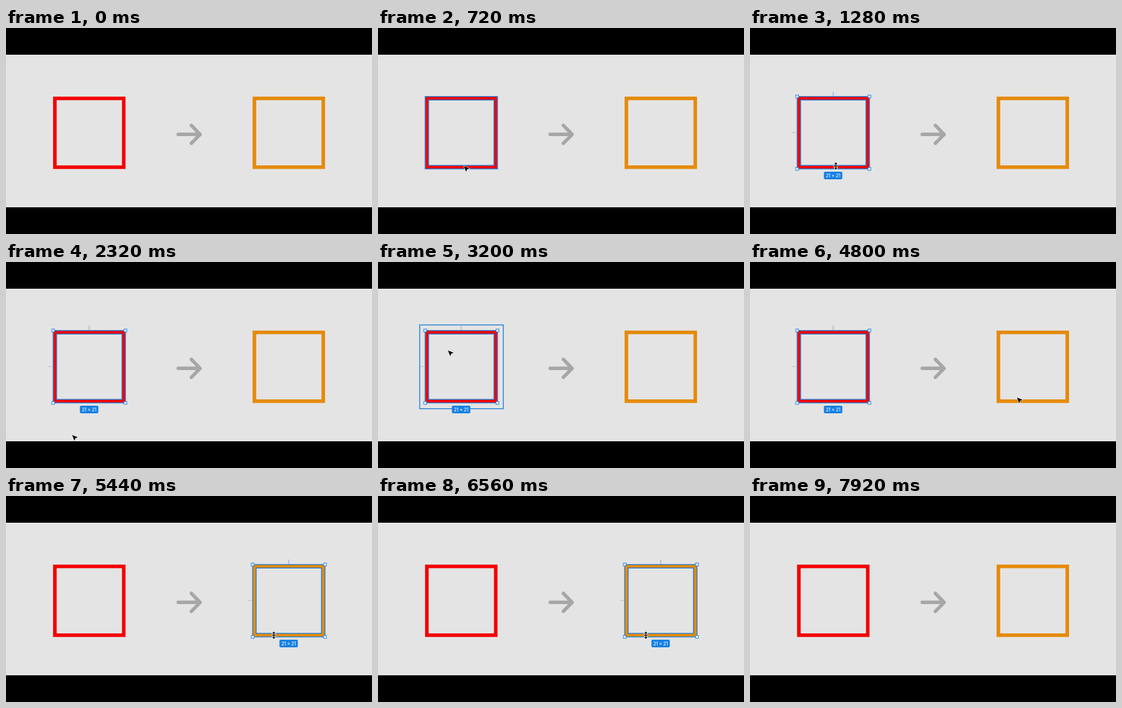
Write an HTML page that moves like this. It is 576 by 324 pixels and loops after 8 s.

```html
<!DOCTYPE html>
<html lang="en">
<head>
<meta charset="utf-8">
<title>Selecting two squares</title>
<style>
  html, body { margin: 0; width: 100%; height: 100%; overflow: hidden; background: #000; }
  svg { display: block; width: 100vw; height: 100vh; }
  .line { fill: none; stroke: #2680d8; stroke-width: 1.4; }
  .tick { fill: none; stroke: #7ba9d6; stroke-width: 1; }
  .knob { fill: #fff; stroke: #2680d8; stroke-width: 1; }
  text { font: 500 7px Inter, Arial, sans-serif; fill: #fff; text-anchor: middle; }
</style>
</head>
<body>
<svg viewBox="0 0 576 324">
  <defs>
    <g id="marks">
      <path class="tick" d="M131 100V107"/>
      <path class="tick" d="M67 164.5H74" stroke-dasharray="1 1"/>
      <rect class="knob" x="72" y="105.5" width="4.4" height="4.4"/>
      <rect class="knob" x="185.8" y="105.5" width="4.4" height="4.4"/>
      <rect class="knob" x="72" y="219.4" width="4.4" height="4.4"/>
      <rect class="knob" x="185.8" y="219.4" width="4.4" height="4.4"/>
      <rect x="116.3" y="226" width="29" height="12" rx="2" fill="#1680e3"/>
      <text x="130.8" y="234.6">21 × 21</text>
    </g>
    <g id="edges">
      <rect class="line" x="74.2" y="107.8" width="113.8" height="113.8"/>
      <rect class="line" x="79.7" y="113.3" width="102.8" height="102.8" stroke-width="1"/>
    </g>
  </defs>
  <rect width="576" height="324"/>
  <rect y="42" width="576" height="240" fill="#e4e4e4"/>
  <path d="M271 167.3H305M291.7 153.2L305.6 167.3L291.7 181.4" fill="none" stroke="#a6a6a6"
    stroke-width="5.4" stroke-linecap="round" stroke-linejoin="round"/>
  <rect x="76.9" y="110.7" width="108.4" height="108.2" fill="none" stroke="#f40000" stroke-width="5.6"/>
  <rect x="390.9" y="110.7" width="108.4" height="108.2" fill="none" stroke="#e58a08" stroke-width="5.6"/>
  <rect id="parent" class="line" x="65.6" y="99" width="131.6" height="131.7"/>
  <use id="edges0" href="#edges"/>
  <use id="edges1" href="#edges" x="314"/>
  <use id="marks0" href="#marks"/>
  <use id="marks1" href="#marks" x="314"/>
  <g id="cursor" stroke="#fff" stroke-linejoin="round" paint-order="stroke">
    <path id="arrow" d="M0 0L9.2 3.7L5.3 5.2L3.6 9.3Z" fill="#080808" stroke-width="1.2"/>
    <path id="resize" d="M0 -6L2.9 -2.8H.7V-.7H3V.7H.7V2.8H2.9L0 6L-2.9 2.8H-.7V.7H-3V-.7H-.7V-2.8H-2.9Z"
      fill="#222" stroke-width="1.2"/>
  </g>
</svg>
<script>
  const LOOP = 8000, STEP = 80, GAP = 314;
  const SELECT_LEFT = 960, SELECT_RIGHT = 5120, DESELECT = 7520, ENTER = 240;

  // Pointer stops: time, x, y
  const stops = [
    [240, 135, 253], [640, 135, 217], [1360, 135, 217], [1680, 131, 229],
    [1760, 131, 229], [2160, 104, 272], [2560, 104, 272], [2800, 107, 250],
    [3120, 110, 139], [3680, 110, 139], [4480, 414, 252], [4640, 414, 252],
    [4800, 420, 213], [5040, 421.5, 219], [8000, 421.5, 219]
  ];

  const $ = id => document.getElementById(id);
  const show = (id, on) => $(id).setAttribute('visibility', on ? 'visible' : 'hidden');
  const ease = u => u * u * (3 - 2 * u);
  const within = (v, a, b) => v >= a && v <= b;

  function pointer(t) {
    if (t <= stops[0][0]) return stops[0].slice(1);
    const i = stops.findIndex(s => s[0] >= t);
    const [ta, xa, ya] = stops[i - 1], [tb, xb, yb] = stops[i];
    const u = ease((t - ta) / (tb - ta));
    return [xa + (xb - xa) * u, ya + (yb - ya) * u];
  }

  function draw(t) {
    const [x, y] = pointer(t);
    const visible = t >= ENTER && t < DESELECT;
    const selected = t < SELECT_LEFT || t >= DESELECT ? -1 : t < SELECT_RIGHT ? 0 : 1;
    let resizing = false;

    for (const side of [0, 1]) {
      const left = 74 + side * GAP;
      const onEdge = visible && within(x, left, left + 114) && within(y, 214, 227);
      const active = selected === side;
      if (active && onEdge) resizing = true;
      show('edges' + side, active || onEdge);
      show('marks' + side, active);
    }

    const inParent = within(x, 65, 197) && within(y, 99, 231);
    show('parent', selected === 0 && inParent && !resizing);
    show('arrow', visible && !resizing);
    show('resize', visible && resizing);
    $('cursor').setAttribute('transform', `translate(${x} ${y})`);
  }

  function tick(now) {
    draw(Math.floor(now % LOOP / STEP) * STEP);
    requestAnimationFrame(tick);
  }
  draw(0);
  requestAnimationFrame(tick);
</script>
</body>
</html>
```
